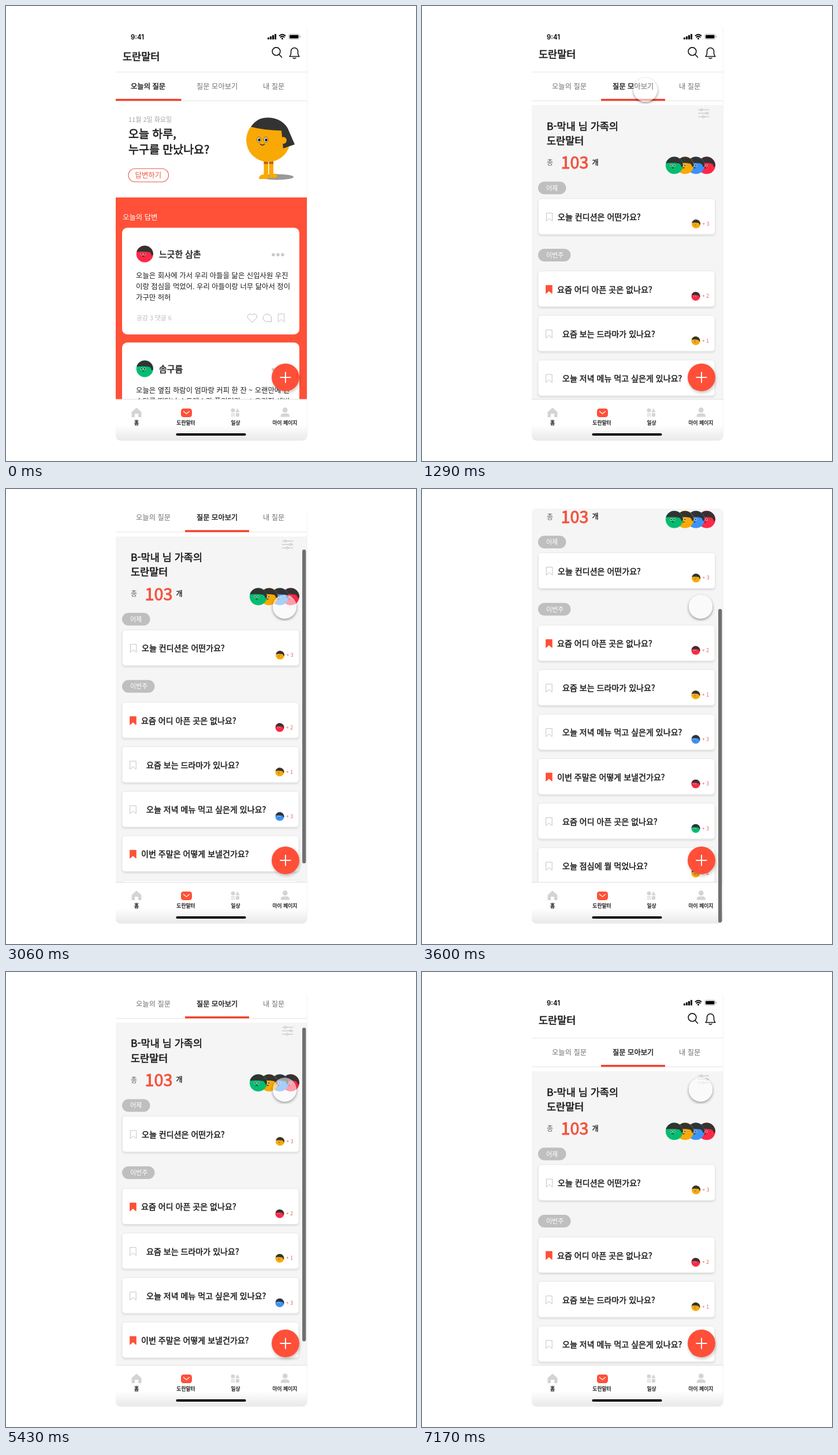
Write an HTML page that moves like this. It is 710 by 789 pixels and loops after 7.2 s.

```html
<!DOCTYPE html>
<html lang="ko">
<head>
<meta charset="utf-8">
<style>
html, body { margin: 0; width: 100%; height: 100%; overflow: hidden; background: #fff; }
svg { display: block; width: 710px; height: 789px; font-family: "Noto Sans CJK KR", "Noto Sans", sans-serif; }
</style>
</head>
<body>
<svg id="stage" viewBox="0 0 710 789"></svg>
<script>
const RED = '#ff5038', INK = '#1b1b1b', HAIR = '#333';
const CRIMSON = '#ff2846', GREEN = '#04bd70', YELLOW = '#f9a905', BLUE = '#3c93f7';
const APP = '도란말터';

const text = (x, y, size, str, fill = INK, more = '') =>
  `<text x="${x}" y="${y}" font-size="${size}" fill="${fill}" ${more}>${str}</text>`;
// Medium weight: the regular face thickened by a thin outline.
const medium = (x, y, size, str, fill = INK, more = '') =>
  text(x, y, size, str, fill, `stroke="${fill}" stroke-width="${size * .034}" ${more}`);
const rect = (x, y, w, h, fill, r = 0, more = '') =>
  `<rect x="${x}" y="${y}" width="${w}" height="${h}" rx="${r}" fill="${fill}" ${more}/>`;
const circle = (x, y, r, fill, more = '') => `<circle cx="${x}" cy="${y}" r="${r}" fill="${fill}" ${more}/>`;
const ellipse = (x, y, rx, ry, fill) => `<ellipse cx="${x}" cy="${y}" rx="${rx}" ry="${ry}" fill="${fill}"/>`;
const fill = (d, color) => `<path d="${d}" fill="${color}"/>`;
const line = (d, color, w = 1) =>
  `<path d="${d}" fill="none" stroke="${color}" stroke-width="${w}" stroke-linecap="round" stroke-linejoin="round"/>`;

const avatar = (x, y, r, color) => `<g transform="translate(${x} ${y}) scale(${r})">
  ${circle(0, 0, 1, color)}
  ${fill('M-.97-.25A1 1 0 0 1 .99 .1L.82 .2Q.75-.1 .6-.2Q-.1-.35-.97-.25Z', HAIR)}
  ${circle(-.36, .02, .13, '#fff')}${circle(-.02, .02, .13, '#fff')}
  ${circle(-.36, .02, .08, '#111')}${circle(-.02, .02, .08, '#111')}
  ${line('M-.28 .27Q-.18 .34-.08 .27', '#222', .07)}</g>`;

const bookmark = (x, y, on) =>
  `<path d="M${x} ${y}h10.5v14l-5.25-4.5l-5.25 4.5Z" fill="${on ? RED : 'none'}" stroke="${on ? RED : '#c4c4c4'}"/>`;

function header(titleY, active) {
  const tabs = [['오늘의 질문', active ? 225 : 216], ['질문 모아보기', 330], ['내 질문', 445]];
  const bars = [0, 1, 2, 3].map(i => rect(453 + i * 4, 54.5 - i * 2, 3, 3.5 + i * 2, '#000', .8)).join('');
  return rect(190, 34, 331, 138, '#fff') +
    text(216, 58, 11.4, '9:41', '#000', 'font-weight="600" font-family="Inter, sans-serif"') + bars +
    line('M473.5 51.5Q478.5 47.5 483.5 51.5M475.3 54Q478.5 51.5 481.7 54', '#000', 1.8) + circle(478.5, 56.6, 1.5, '#000') +
    rect(489.5, 48.7, 18.5, 9, 'none', 2.6, 'stroke="#aaa" stroke-width=".8"') +
    rect(491, 50.2, 15.5, 6, '#000', 1.4) + rect(508.8, 51.6, 1.2, 3, '#aaa', .6) +
    medium(202, titleY, 17.5, APP) +
    circle(468, 78.8, 6.9, 'none', 'stroke="#111" stroke-width="1.6"') + line('M473 84L477.5 89', '#111', 1.6) +
    line('M491 87.5H508Q505.5 85.5 505.5 82V78.5A6 6 0 0 0 493.5 78.5V82Q493.5 85.5 491 87.5ZM497.2 90Q499.5 92 501.8 90', '#111', 1.6) +
    rect(190, 114, 331, 1, '#e6e6e6') +
    tabs.map(([s, x], i) => i == active ? medium(x, 144, 12.3, s) : text(x, 144, 12.3, s, '#707070')).join('') +
    rect(190, 164, 331, 1, '#e4e4e4') +
    (active ? rect(310, 161, 111, 3.5, '#f5412c') : rect(190, 161, 113.5, 3.5, '#f5412c'));
}

const character = ellipse(469, 296.5, 29, 5, '#999') +
  rect(446.5, 268, 7.5, 27, YELLOW) + rect(455.5, 268, 7.5, 27, YELLOW) +
  rect(446.5, 268, 7.5, 6, '#b5651d') + rect(455.5, 268, 7.5, 6, '#b5651d') +
  fill('M438 300Q438 292 447 292H454V300ZM455 298Q455 292 460 291H468Q471 298 467 298Z', YELLOW) +
  circle(454, 232.5, 38, YELLOW) +
  fill('M424 209.5C433 197 442 193.5 454 193.5C472 194 486 204 490 217L500 240L480 247L477 216Q450 216 424 209.5Z', HAIR) +
  circle(480, 233, 6, YELLOW) +
  [438, 450].map(x => ellipse(x, 232, 3.6, 5, '#222') + ellipse(x, 232, 2.9, 4.3, '#fff') + ellipse(x + .4, 232.3, 1.9, 2.8, '#111')).join('') +
  line('M440.5 239.5Q444 243 447.5 239.5', '#222', 1.3);

const answer = (y, color, name, lines) => rect(201, y, 307, 185, '#fff', 9) +
  avatar(240.3, y + 45.5, 14.6, color) + medium(265, y + 51, 14.9, name) +
  [463, 471, 479].map(x => circle(x, y + 46.7, 2.8, '#c9c9c9')).join('') +
  lines.map((s, i) => text(225, y + 87.5 + i * 18.8, 12.4, s)).join('') +
  text(226, y + 160, 10.8, '공감 3 댓글 6', '#bdbdbd') +
  line(`M426.5 ${y + 164}L419.5 ${y + 157}A4.6 4.6 0 0 1 426.5 ${y + 151}A4.6 4.6 0 0 1 433.5 ${y + 157}Z`, '#bbb') +
  line(`M459.5 ${y + 163}V${y + 156}A7.2 6.6 0 1 0 455 ${y + 162.5}Z`, '#bbb') + bookmark(471.3, y + 149.5);

const todayPage = rect(190, 34, 331, 650, '#fff') + header(94, 0) +
  text(212, 201, 11, '11월 2일 화요일', '#a5a5a5') +
  medium(212, 229, 19.5, '오늘 하루,') + medium(212, 256, 19.5, '누구를 만났나요?') +
  rect(212, 282, 69.5, 23, '#fff', 11.5, 'stroke="#ea5543" stroke-width="1.1"') + text(223.5, 298, 12.4, '답변하기', '#ea5543') +
  character + rect(190, 332, 331, 352, RED) + text(202, 371, 12.4, '오늘의 답변', '#fff') +
  answer(384.5, CRIMSON, '느긋한 삼촌', ['오늘은 회사에 가서 우리 아들을 닮은 신입사원 우진', '이랑 점심을 먹었어. 우리 아들이랑 너무 닮아서 정이', '가구만 허허']) +
  answer(583.5, GREEN, '솜구름', ['오늘은 옆집 하람이 엄마랑 커피 한 잔 ~ 오랜만에 진', '수다를 떨더니 스트레스가 풀리더라 ~ ^ 우리집 세번']);

const pill = (y, w, s) => rect(201, y, w, 22, '#bfbfbf', 11) + text(215, y + 15, 11, s, '#fff');
const question = (y, s, color, n, on, x = 201, textX = on ? 234 : 243) =>
  rect(x, y, 306, 62, '#fff', 5, 'stroke="#e2e2e2" stroke-width=".8" filter="url(#soft)"') +
  bookmark(x + 13.7, y + 25, on) + medium(textX, y + 37, 14.05, s) +
  avatar(x + 273, y + 43.8, 7.6, color) + text(x + 284, y + 46.8, 8.6, '+ ' + n, '#e4604f');
const questions = [
  ['요즘 어디 아픈 곳은 없나요?', CRIMSON, 2, 1], ['요즘 보는 드라마가 있나요?', YELLOW, 1],
  ['오늘 저녁 메뉴 먹고 싶은게 있나요?', BLUE, 3], ['이번 주말은 어떻게 보낼건가요?', CRIMSON, 3, 1],
  ['요즘 어디 아픈 곳은 없나요?', GREEN, 3], ['오늘 점심에 뭘 먹었나요?', YELLOW, 2]];

const listPage = rect(190, 34, 331, 1000, '#f5f5f5') + header(89.5, 1) +
  [[180, 484], [186, 493], [192, 487]].map(([y, x]) => line(`M478.5 ${y}H497`, '#bbb') + circle(x, y, 1.8, '#f5f5f5', 'stroke="#bbb"')).join('') +
  medium(216, 214.5, 17.5, 'B-막내 님 가족의') + medium(216, 240, 17.5, APP) +
  text(216, 276, 12, '총', '#666') + medium(240.5, 282.3, 28.8, '103', '#f5523c') + medium(294.5, 275.5, 12, '개') +
  [CRIMSON, BLUE, YELLOW, GREEN].map((c, i) => avatar(493 - i * 18.7, 276.3, 15, c)).join('') +
  pill(304.5, 48.5, '어제') + question(334, '오늘 컨디션은 어떤가요?', YELLOW, 3, 0, 201.6, 235) +
  pill(421, 56.5, '이번주') + questions.map((q, i) => question(459.5 + i * 77.2, ...q)).join('');

const GREY = '#d4d4d4';
const nav = rect(190, 682, 331, 72, 'url(#navFill)') + rect(190, 681.5, 331, 1, '#dedede') +
  fill('M217.5 704L226 696.5L234.5 704V713H229V707H223V713H217.5Z', GREY) +
  rect(303, 698, 19, 15, RED, 4.5) + line('M307.5 703L312.5 707L317.5 703', '#fff', 1.3) +
  circle(393, 701.2, 3.4, GREY) + fill('M400.8 697.5L404.5 704.5H397.2Z', GREY) +
  rect(389.5, 706.5, 7, 1.7, GREY) + rect(389.5, 709.8, 7, 1.7, GREY) + rect(398, 706, 6, 6, GREY, 1) +
  circle(483.3, 700.7, 4.4, GREY) + fill('M475.5 712.5Q475.5 706.5 480 706.5H487Q491 706.5 491 712.5Z', GREY) +
  [[226, '홈'], [311.5, APP], [397.5, '일상'], [483, '마이 페이지']].map(([x, s]) => medium(x, 726, 8.8, s, INK, 'text-anchor="middle"')).join('') +
  rect(294.5, 741, 121, 4, '#000', 2);

const addButton = circle(484, 644, 24, RED, 'filter="url(#lift)"') +
  rect(474.5, 643, 19, 2, '#fff') + rect(483, 634.5, 2, 19, '#fff');

const stage = document.getElementById('stage');
stage.innerHTML = `<defs>
  <clipPath id="phone">${rect(190, 34, 331, 719, '#000', 8)}</clipPath>
  <linearGradient id="navFill" x2="0" y2="1"><stop offset=".62" stop-color="#fff"/><stop offset="1" stop-color="#e8e8e8"/></linearGradient>
  <filter id="soft" x="-5%" y="-20%" width="110%" height="150%"><feDropShadow dx="0" dy="2" stdDeviation="1.5" flood-opacity=".12"/></filter>
  <filter id="lift" x="-30%" y="-30%" width="160%" height="170%"><feDropShadow dx="1" dy="3" stdDeviation="2.5" flood-opacity=".22"/></filter>
  <filter id="halo" x="-40%" y="-40%" width="180%" height="180%"><feDropShadow dx="0" dy="2" stdDeviation="2.5" flood-opacity=".45"/></filter>
  <mask id="ring">${rect(-40, -40, 80, 80, '#fff')}${circle(0, 0, 20.5, '#000')}</mask></defs>
  ${rect(190.5, 34.5, 331, 719, '#fff', 8, 'stroke="#eee" stroke-width=".8"')}
  <g clip-path="url(#phone)"><g>${todayPage}</g><g id="list"><g id="scroller">${listPage}</g></g>${addButton}${nav}
  ${rect(513, 36, 6.4, 544, '#707070', 3.2, 'id="bar"')}</g>
  <g id="cursor"><g mask="url(#ring)">${circle(0, 0, 20.5, '#fff', 'filter="url(#halo)"')}</g>
  ${circle(0, 0, 20.5, '#fff', 'fill-opacity=".55"')}</g>`;

const [list, scroller, bar, cursor] = ['list', 'scroller', 'bar', 'cursor'].map(id => document.getElementById(id));
const ramp = (t, a, b) => Math.min(1, Math.max(0, (t - a) / (b - a)));
const ease = (t, a, b) => { const x = ramp(t, a, b); return x * x * (3 - 2 * x); };

function draw() {
  const t = performance.now() % 7200;
  const down = ease(t, 2686, 3550), move = ease(t, 1600, 2200);
  list.setAttribute('opacity', ramp(t, 900, 1150));
  scroller.setAttribute('transform', `translate(0 ${-223.5 * (down - ease(t, 4927, 5791))})`);
  bar.setAttribute('y', 36 + 172 * (down - ease(t, 4890, 5791)));
  bar.setAttribute('opacity', ramp(t, 2686, 2800) - ramp(t, 4000, 4200) + ramp(t, 4890, 5000) - ramp(t, 6350, 6550));
  cursor.setAttribute('transform', `translate(${387 + 95.5 * move} ${145.5 + 58.5 * move})`);
  cursor.setAttribute('opacity', ramp(t, 550, 700));
  requestAnimationFrame(draw);
}
draw();
</script>
</body>
</html>
```
